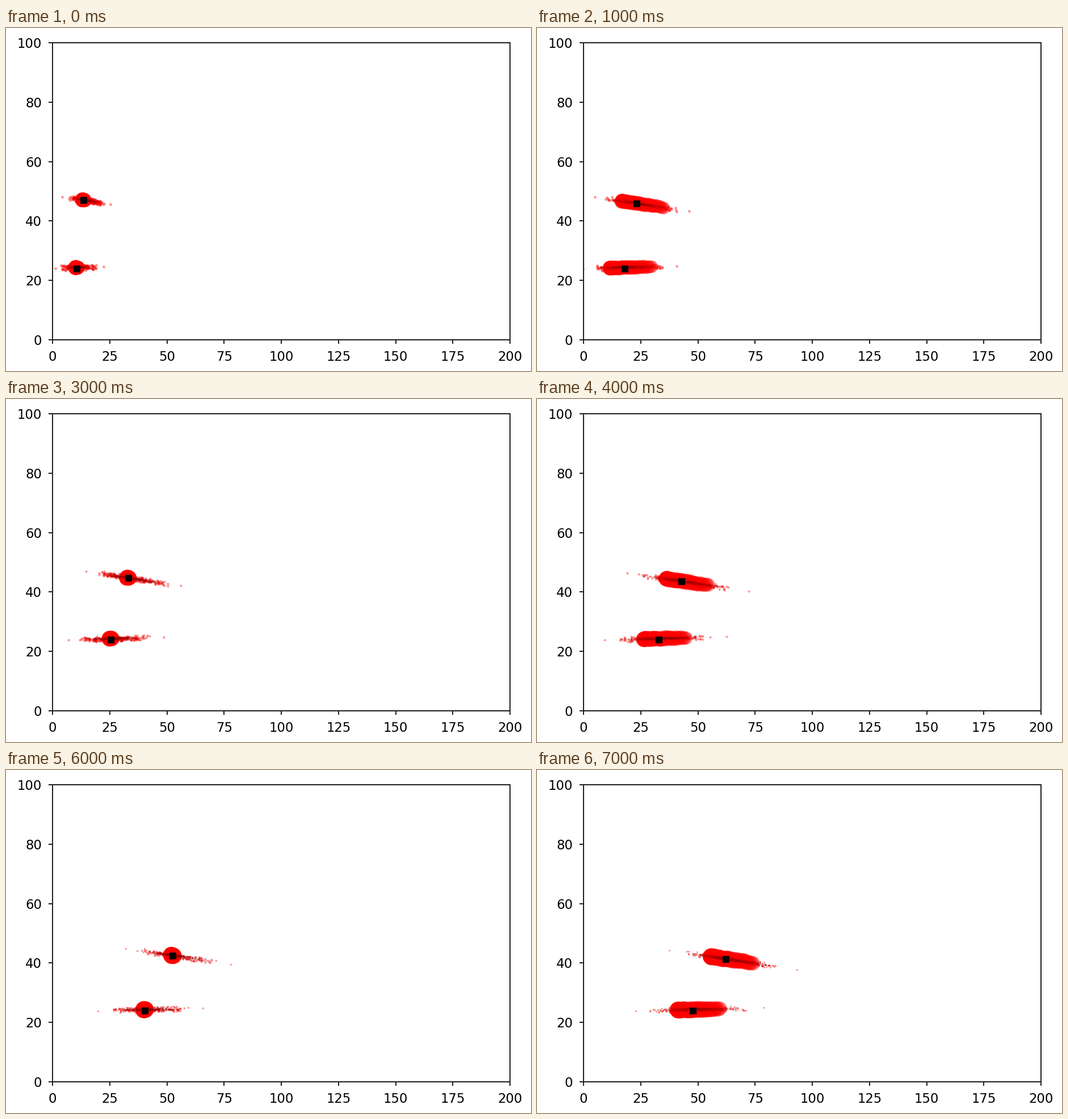
Recreate the animation shown at these times as a matplotlib script. Size 925 by 605 pixels, loop 8 s.

```python
import numpy as np
import matplotlib.pyplot as plt
from matplotlib.animation import ArtistAnimation
from matplotlib.collections import LineCollection

W, H, DPI = 925, 605, 100
PT = 72 / DPI  # points per pixel
LEFT, TOP, WIDTH, HEIGHT = 82, 26, 806, 524
STEPS = 8

# Tracks in pixels: speed is per cycle of three steps, drift is the slope of
# the path, tilt the slope of the cloud, lift its height above the estimate.
TRACKS = [
    dict(x0=137, y0=304, speed=78.5, drift=0.152, tilt=0.152, lift=0.5),
    dict(x0=125, y0=425, speed=60, drift=0, tilt=-0.027, lift=2.4),
]


def to_data(x, y):
    return (x - LEFT) * 200 / WIDTH, (TOP + HEIGHT - y) * 100 / HEIGHT


def area(diameter):
    return (diameter * PT) ** 2


def draw_cloud(ax, rng, step, x0, y0, speed, drift, tilt, lift):
    # Each cycle: resample, then two moves that widen the cloud
    cycle, phase = divmod(step, 3)
    moved = speed * (cycle + (0, 0.5, 0.9)[phase])
    mark_x, mark_y = x0 + moved, y0 + drift * moved
    spread = 100 + 20 * phase - 55 * 0.6 ** step

    def cloud_y(dx, noise):
        return mark_y - lift + tilt * dx + noise

    # Small particles, with one straggler at each end
    tail0, tail1 = -0.85 * spread, 1.05 * spread
    dx = np.r_[tail0, rng.triangular(0.8 * tail0, 0, 0.8 * tail1, 240), tail1]
    noise = np.clip(rng.normal(0, 2.4, dx.size), -4.5, 4.5)
    noise[[0, -1]] = 0
    px, py = to_data(mark_x + dx, cloud_y(dx, noise))
    dots = ax.scatter(px, py, s=area(5 - 0.25 * step), c="red", alpha=0.4,
                      linewidths=0, zorder=3)

    # Heavy particles, sparser toward the front
    t = np.linspace(0, 1, 40) ** 1.8
    core0, core1 = -3 - 24 * phase, 3 + 44 * phase
    cx = core0 + (core1 - core0) * t
    cy = cloud_y(cx, rng.uniform(-1, 1, t.size))
    radius = (12.2 + 0.3 * step) * (1 - 0.12 * t ** 4)
    core = ax.scatter(*to_data(mark_x + cx, cy), s=area(2 * radius), c="red",
                      alpha=0.5, linewidths=0, zorder=4)

    # Hairlines between successive particles
    points = np.column_stack([px, py])
    links = LineCollection(np.stack([points[:-1], points[1:]], axis=1),
                           colors="black", linewidths=0.5 * PT,
                           alpha=0.035, zorder=5)
    ax.add_collection(links)

    mark, = ax.plot(*to_data(mark_x, mark_y), "s", color="black",
                    ms=12 * PT, mew=0, zorder=6)
    return [dots, core, links, mark]


plt.rcParams.update({"font.family": "DejaVu Sans", "font.size": 16.4})
fig = plt.figure(figsize=(W / DPI, H / DPI), dpi=DPI, facecolor="white")
ax = fig.add_axes([LEFT / W, 1 - (TOP + HEIGHT) / H, WIDTH / W, HEIGHT / H])
ax.set(xlim=(0, 200), ylim=(0, 100), autoscale_on=False,
       xticks=range(0, 201, 25), yticks=range(0, 101, 20))
ax.tick_params(length=7 * PT, width=2 * PT, pad=12 * PT, color="0.12")
for spine in ax.spines.values():
    spine.set(linewidth=2 * PT, edgecolor="0.12", zorder=7)

rng = np.random.default_rng(4)
frames = [
    [artist for track in TRACKS for artist in draw_cloud(ax, rng, k, **track)]
    for k in range(STEPS)
]

anim = ArtistAnimation(fig, frames, interval=1000, repeat=True, repeat_delay=0)
plt.show()
```
